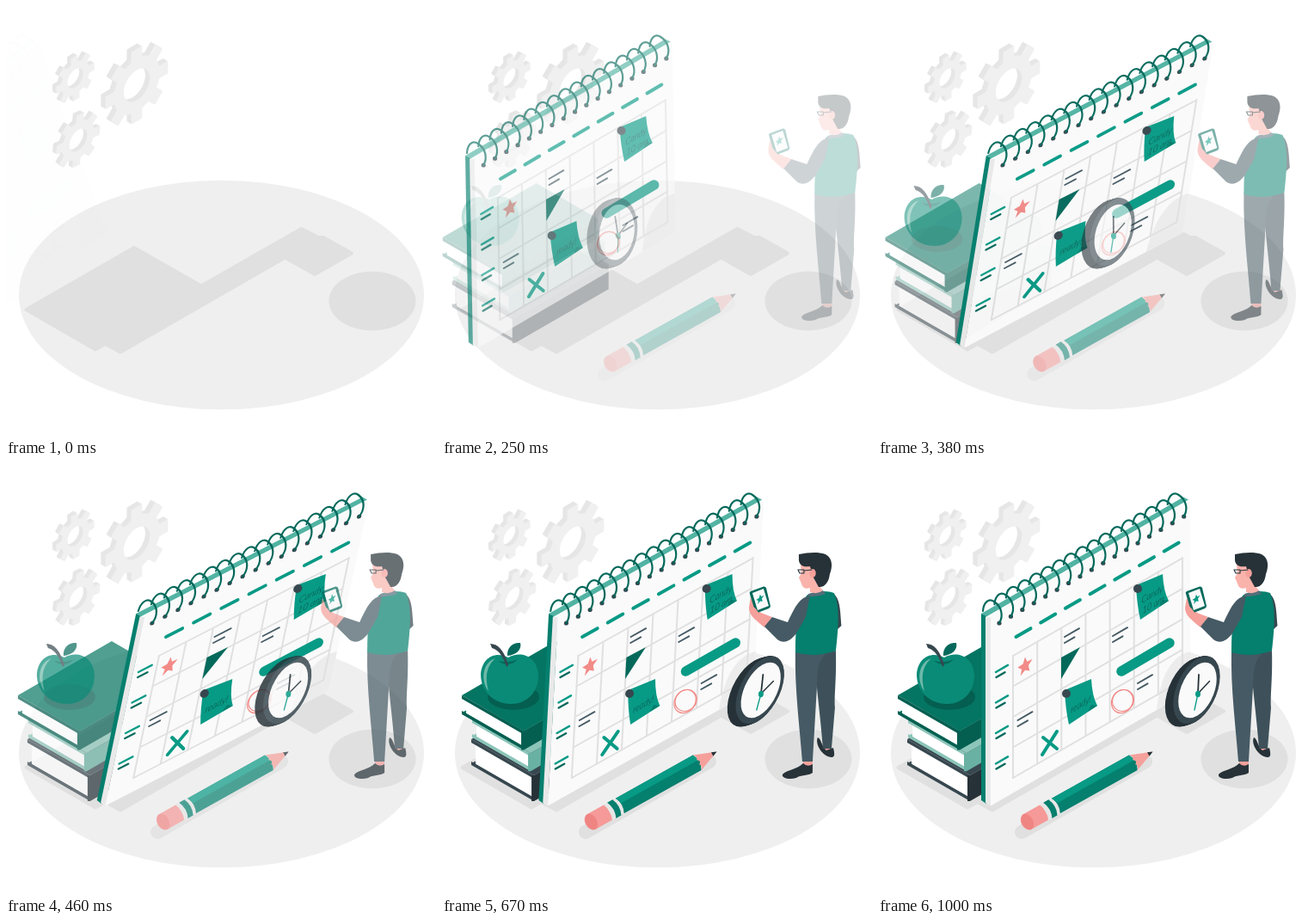
Recreate the animation shown at these times as an HTML page. Size 500 by 500 pixels, loop 1040 ms.

```html
<!DOCTYPE html>
<html lang="en">
<head>
<meta charset="utf-8">
<title>Planning</title>
<style>
  html, body { margin: 0; width: 100%; height: 100%; overflow: hidden; background: #fff; }
  svg { display: block; width: 100vw; height: 100vh; }
  .line { fill: none; stroke-linecap: round; stroke-linejoin: round; }
  .note { font: italic 300 11px Lato, "Open Sans", sans-serif; fill: #0b4a42; }
</style>
</head>
<body>
<svg viewBox="0 0 500 500">
  <ellipse cx="250.5" cy="336" rx="235.5" ry="133.3" fill="#efefef"/>
  <g fill="#e0e0e0" stroke="#e0e0e0" stroke-width="4" stroke-linejoin="round">
    <path d="M23.500 353L149 281 227 325.500 343.500 259 363 269 369 269 402 287.500 359 312 324.500 292.500 133 402.500 115.500 393 104 399.500Z"/>
  </g>
  <ellipse cx="426" cy="343" rx="50.500" ry="34.500" fill="#e0e0e0"/>
  <g id="gears"></g>
  <g id="books"></g>

  <g id="apple">
    <path d="M77 225C90 217 111 222 112 246C112 266 98 279 80 279C60 279 45 264 45 245C46 225 62 217 77 225Z" fill="#0a8b77"/>
    <path d="M62 226C46 231 45 253 54 264C49 245 53 234 62 226Z" fill="#6db9aa"/>
    <path d="M65 229C73 235 82 234 88 227C82 230 75 231 65 229Z" fill="#04695b"/>
    <path d="M56 209Q70 209 77 234L75 236Q69 217 58 214Z" fill="#37474f"/>
    <path d="M76 223C75 213 83 207 91 208C93 216 86 222 76 223Z" fill="#04695b"/>
  </g>

  <g id="calendar">
    <path d="M122 174L357 38.500 363 41.500 128 177.500Z" fill="#52b3a3"/>
    <path d="M122 174L128 177V395L122 391Z" fill="#057f6e"/>
    <path d="M127 177.500L133 178V397.500L127 394Z" fill="#e9e9e9"/>
    <path d="M130 178L365 42.500V263.500L133 397.500V178Z" fill="#fafafa"/>
    <path d="M326 286C330 245 345 222 365 218V263.500Z" fill="#ececec"/>
    <g id="grid" class="line" stroke="#e0e0e0" stroke-width="2"></g>
    <g id="marks"></g>
    <path d="M215 225L237 213 215 250Z" fill="#04695b"/>
    <path class="line" d="M194 318L210 331M210 311L193 338" stroke="#079a85" stroke-width="4"/>
    <path class="line" d="M285 241L341 208" stroke="#079a85" stroke-width="11.500"/>
    <g class="line" stroke="#f28b88" stroke-width="1.200">
      <ellipse cx="286" cy="276" rx="12" ry="14" transform="rotate(30 286 276)"/>
      <ellipse cx="287" cy="275" rx="12" ry="13" transform="rotate(45 287 275)"/>
    </g>
    <g id="notes"></g>
    <g id="rings"></g>
  </g>

  <g id="clock"></g>

  <g id="pencil">
    <path class="line" d="M167 428L311 346" stroke="#e0e0e0" stroke-width="16"/>
    <g transform="translate(172 417) rotate(-29.200)">
      <path d="M26 -10H3C-8 -10 -8 10 3 10H26Z" fill="#f59a98"/>
      <ellipse cx="2" cy="0" rx="6.500" ry="10" fill="#ef8583"/>
      <path d="M24 -10.500H41V10.500H24Q29 0 24 -10.500Z" fill="#e6e6e6"/>
      <path d="M29 -10.500H36Q41 0 36 10.500H29Q34 0 29 -10.500Z" fill="#057f6e"/>
      <path d="M40 -10H143L147 0 143 10H40Q45 0 40 -10Z" fill="#057f6e"/>
      <path d="M40 -10H143L146 -2H43Z" fill="#079a85"/>
      <path d="M143 -10L169 0 143 10Q147 6 144 3 149 0 144 -3 147 -6 143 -10Z" fill="#f5a09b"/>
      <path d="M163 -2.500L169 0 163 2.500Z" fill="#263238"/>
    </g>
  </g>

  <g id="man">
    <path d="M451 150C463 151 463 168 464.500 188L459 193 452 190Z" fill="#37474f"/>
    <path d="M444 328H453V336L445 335Z" fill="#f5a09b"/>
    <path d="M420 343H431V353L420 352Z" fill="#f5a09b"/>
    <path d="M437 318C441 319 441 328 447 333L455 330Q458 340 454 341C444 342 433 326 437 318Z" fill="#263238"/>
    <path d="M396 361C400 356 414 355 420 348Q425 353 431 349L431 359C426 363 417 361 412 365C405 367 395 366 396 361Z" fill="#263238"/>
    <path d="M433 220L458 217C459 250 456 268 457 283L453 331H443C440 290 435 260 433 220Z" fill="#3e515a"/>
    <path d="M411 217L446 221C436 230 437 245 436 260L431 346H419C416 305 410 262 411 217Z" fill="#455a64"/>
    <path d="M424 153C432 147 449 147 456 150C463 166 461 190 458 217Q433 226 411 219C411 195 412 185 416 173Z" fill="#057f6e"/>
    <path d="M426 151L443 147 446 151Q436 155 426 154Z" fill="#546e7a"/>
    <path d="M384 178L375 190C366 182 357 177 357 167L359 156 366 168 371 173Z" fill="#f5a09b"/>
    <path d="M428 153C416 155 411 165 402 184L384 178 375 189 390 204C398 210 406 205 412 197L423 178Z" fill="#455a64"/>
    <path d="M359 148L374 142.500Q376 142 377 144L382 165Q382 167 380 168L367 173Q365 173 364 171L358 151Q357 149 359 148Z" fill="#04695b"/>
    <path d="M361 150L374 145 380 165 367 170Z" fill="#fafafa"/>
    <path d="M359 164Q364 166 369 174L363 177Z" fill="#f5a09b"/>
    <path d="M417 117L433 117 437 140 443 147Q437 152 428 149L428 144C423 146 419 144 418 139L415 132 418 127Z" fill="#f9b3ab"/>
    <path d="M415 105C426 103 437 102 446 105C455 110 454 120 451 128C450 137 445 144 438 143L432 132 428 119C422 120 416 119 415 112Z" fill="#263238"/>
    <ellipse cx="431" cy="127" rx="3.800" ry="5" fill="#f5a09b"/>
    <path class="line" d="M414 123H421V127H416ZM421 124L430 123" stroke="#263238" stroke-width="1.100"/>
    <g id="phoneStar"></g>
  </g>
</svg>
<script>
const el = id => document.getElementById(id);
const range = (n, fn) => Array.from({ length: n }, (_, i) => fn(i)).join('');
const SLOPE = 0.577;
const MAIN = '#079a85', DEEP = '#04695b', SLATE = '#455a64', INK = '#263238';
const onPlane = (x, y) => `matrix(.866 -.5 0 1 ${x} ${y})`;

const stroke = (x, y, w, color, width) =>
  `<path class="line" d="M${x} ${y}l${w} ${-w * SLOPE}" stroke="${color}" stroke-width="${width}"/>`;

const polar = (r, a) => `${(r * Math.sin(a)).toFixed(2)} ${(-r * Math.cos(a)).toFixed(2)}`;

function star(x, y, r, color) {
  const points = range(10, i => polar(i % 2 ? r * 0.45 : r, i * Math.PI / 5) + ' ');
  return `<polygon points="${points}" transform="${onPlane(x, y)}" fill="${color}"/>`;
}

function gear(x, y, r, hole, depth, turn) {
  const teeth = range(8, i => {
    const a = i * Math.PI / 4 + turn;
    return [[0.76, -0.24], [1.04, -0.17], [1.04, 0.17], [0.76, 0.24]]
      .map(([k, da]) => polar(r * k, a + da)).join('L') + 'L';
  }).slice(0, -1);
  const d = `M${teeth}ZM${-hole} 0a${hole} ${hole} 0 1 0 ${2 * hole} 0a${hole} ${hole} 0 1 0 ${-2 * hole} 0Z`;
  return range(depth + 1, i => {
    const back = depth - i;
    return `<path d="${d}" fill-rule="evenodd" fill="${back ? '#e6e6e6' : '#f0f0f0'}"
      transform="${onPlane(x - back * 0.87, y - back * 0.5)}"/>`;
  });
}

// A lying book: (x, y) is its upper left corner, w the run of the page side.
function book(x, y, w, h, top, side, spine) {
  const drop = w * SLOPE, length = 109, rise = length * SLOPE;
  const edge = at => `<path d="M${x} ${at}l${w} ${drop}v4l${-w} ${-drop}Z" fill="${side}"/>`;
  return `<path d="M${x} ${y}l${length} ${-rise} ${w} ${drop} ${-length} ${rise}Z" fill="${top}"/>
    <path d="M${x} ${y + h - 2}l8 -4 ${w - 8} ${drop}v4Z" fill="${top}"/>
    <path d="M${x + 5} ${y + 5}l${w - 7} ${drop - 4}v${h - 6}l${7 - w} ${4 - drop}Z" fill="#fff"/>
    ${edge(y)}${edge(y + h - 4)}
    <path d="M${x + w - 3} ${y + drop}h3l${length} ${-rise}v${h}l${-length} ${rise}h-3Z" fill="${spine}"/>`;
}

function note(x, y, lines, baseline) {
  const text = lines.map((s, i) =>
    `<text class="note" text-anchor="middle" transform="${onPlane(x + 19 + i, y + baseline + i * 12)}">${s}</text>`).join('');
  return `<path d="M${x} ${y}L${x + 31} ${y - 13}Q${x + 32} ${y + 7} ${x + 38} ${y + 18}L${x + 5} ${y + 40}Q${x + 1} ${y + 22} ${x} ${y}Z" fill="${MAIN}"/>
    <path d="M${x + 31} ${y + 17}L${x + 38} ${y + 18} ${x + 27} ${y + 25}Z" fill="#057f6e"/>${text}
    <circle cx="${x + 2}" cy="${y + 4}" r="5" fill="#37474f"/>`;
}

el('gears').innerHTML = gear(152, 92, 41, 17.5, 6, 0) +
  gear(80.5, 84, 25, 10.5, 5, -0.06) + gear(84, 156, 28.5, 12, 5, 0.1);

el('books').innerHTML =
  book(34, 320, 73, 30, '#37474f', '#37474f', INK) +
  book(35, 297, 68, 21, '#8cc5b9', '#8cc5b9', '#69b1a3') +
  book(23, 269, 72, 22, '#047562', '#045f51', '#045f51') +
  '<ellipse cx="83" cy="271" rx="30" ry="15" fill="#045f51"/>';

const column = 28.15, row = 35.5, left = 159, top0 = 223;
el('grid').innerHTML =
  range(8, i => `<path d="M${left + i * column} ${top0 - i * column * SLOPE}v${4 * row}"/>`) +
  range(5, i => `<path d="M${left} ${top0 + i * row}l${7 * column} ${-7 * column * SLOPE}"/>`);

const entry = (x, y) => stroke(x, y, 17, SLATE, 2) + stroke(x, y + 7, 11.5, SLATE, 2);
el('marks').innerHTML =
  range(7, i => stroke(162.5 + i * 28.7, 201 - i * 16.6, 17, MAIN, 4)) +
  range(4, i => stroke(139, 242 + i * row, 14, MAIN, 2.5) + stroke(139.5, 248 + i * row, 10, DEEP, 2.5)) +
  entry(219, 201) + entry(275, 200) + entry(164.5, 298) + entry(304, 255) +
  star(173, 235, 10.5, '#f28b88');

el('notes').innerHTML = note(302, 141, ['Candy', '10 am'], 14) + note(219, 263, ['ready!'], 20);

el('rings').innerHTML = range(17, i =>
  `<g transform="translate(${143 + i * 13.42} ${185 - i * 7.75})">
    <circle r="2.6" fill="#37474f"/>
    <path class="line" d="M-19 -14C-18 -25 -12 -29 -6 -25C3 -19 5 -8 0 0" stroke="${DEEP}" stroke-width="2.200"/>
  </g>`);

const disc = (x, y, r, color) =>
  `<circle r="${r}" fill="${color}" transform="matrix(.81 -.48 0 1.07 ${x} ${y})"/>`;
el('clock').innerHTML =
  range(9, i => disc(361.5 + i, 265.5 - i * 0.3, 34.2, INK)) +
  disc(370.5, 262.8, 33.5, '#37474f') + disc(371.5, 263, 27.5, '#fafafa') +
  `<g class="line" stroke="${INK}"><path d="M372 267L373 245" stroke-width="1.800"/>
   <path d="M372 267L385.500 252.500" stroke-width="1.500"/>
   <path d="M372 267L368 286" stroke="${MAIN}" stroke-width="1.300"/></g>
   <ellipse cx="372" cy="267.500" rx="3" ry="3.700" fill="${MAIN}"/>`;

el('phoneStar').innerHTML = star(370, 157, 5.5, MAIN);

const clamp = v => Math.max(0, Math.min(1, v));
const mix = (a, b, k) => a + (b - a) * k;

function bezier(x1, y1, x2, y2) {
  const at = (a, b, s) => 3 * (1 - s) ** 2 * s * a + 3 * (1 - s) * s * s * b + s ** 3;
  return x => {
    if (x <= 0) return 0;
    if (x >= 1) return 1;
    let lo = 0, hi = 1;
    for (let i = 0; i < 24; i++) {
      const mid = (lo + hi) / 2;
      if (at(x1, x2, mid) < x) lo = mid; else hi = mid;
    }
    return at(y1, y2, lo);
  };
}
const spring = bezier(0.36, -0.01, 0.5, 1.38);
const easeIn = bezier(0.42, 0, 1, 1);

function place(id, dx, skew, progress) {
  const k = Math.tan(skew * Math.PI / 180);
  el(id).setAttribute('transform', `matrix(1 0 ${k} 1 ${dx - 250 * k} 0)`);
  el(id).setAttribute('opacity', clamp(progress));
}

function calendarSkew(t) {
  if (t < 600) return mix(20, -10, spring(t / 600));
  if (t < 800) return mix(-10, 2, spring((t - 600) / 200));
  return mix(2, 0, spring((t - 800) / 200));
}

function draw(now) {
  // 24 poses per second, sampled shortly after each tick
  const tick = Math.min(24, Math.floor((now % 1040 + 7) * 0.024));
  const t = tick * 1000 / 24 + 17;

  const slide = spring(t / 1000);
  for (const id of ['books', 'apple']) place(id, -30 * (1 - slide), 0, slide);
  for (const id of ['pencil', 'man']) place(id, 30 * (1 - slide), 0, slide);

  const rush = spring(t / 600);
  place('calendar', -250 * (1 - rush) - 2, calendarSkew(t), rush);

  const roll = easeIn(t / 532);
  const lean = t < 532 ? mix(20, -8, roll) : mix(-8, 0, clamp((t - 532) / 270));
  place('clock', -250 * (1 - roll), lean, roll);
}

const start = performance.now();
function loop() {
  draw(performance.now() - start);
  requestAnimationFrame(loop);
}
loop();
</script>
</body>
</html>
```
